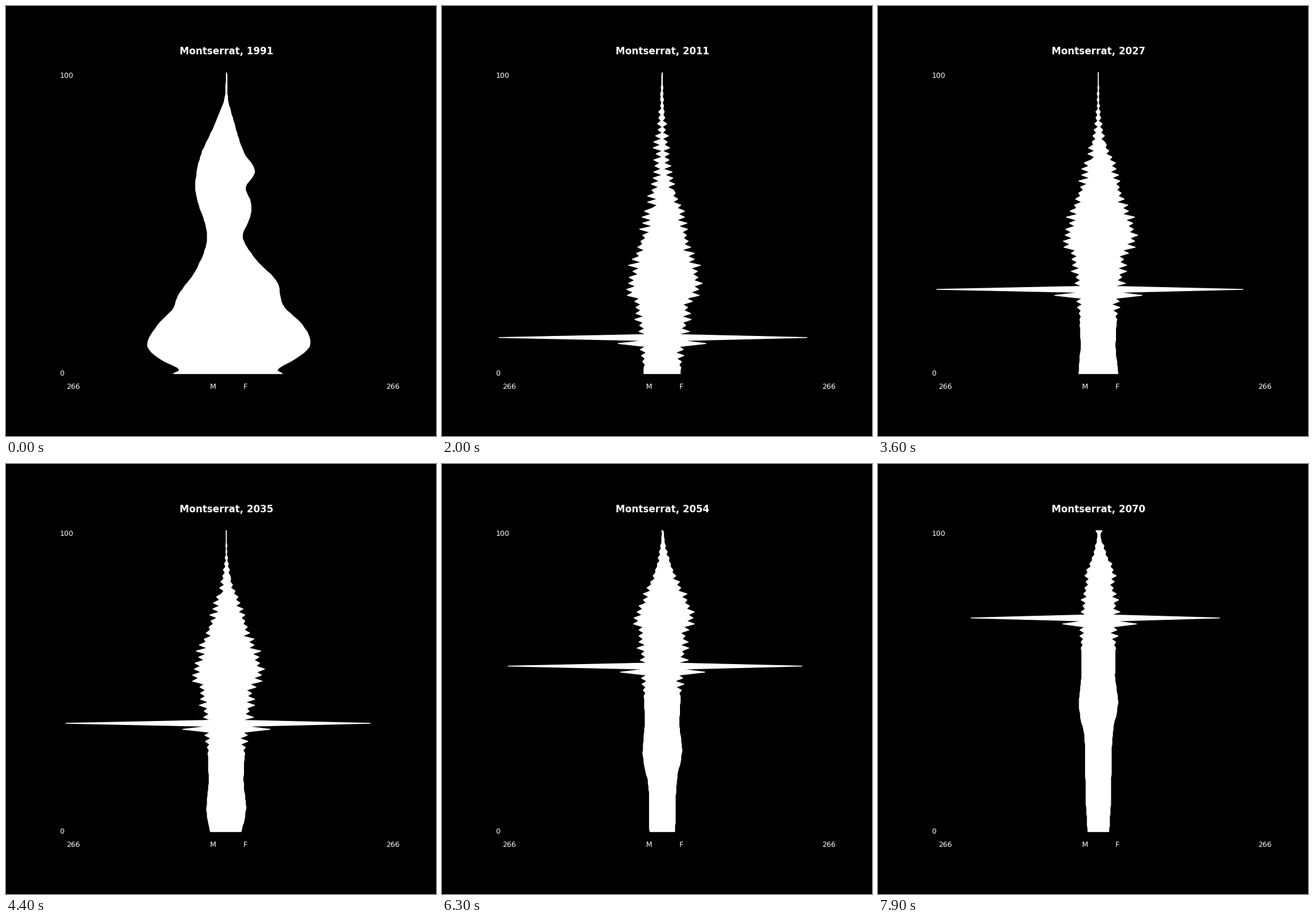
Write a matplotlib script that moves like this. It is 748 by 748 pixels and loops after 8000 ms.

```python
import numpy as np
import matplotlib.pyplot as plt
from matplotlib.animation import FuncAnimation

FIRST, YEARS = 1991, 80
AGES = np.arange(101)
BORN = np.arange(FIRST - 100, FIRST + YEARS)
HALF = 271  # half the axis width, in people

# Share of the 2000 head count still present in 2011, by birth year
KEPT = [(1911, .06), (1921, .2), (1926, .4), (1931, .63), (1936, .83), (1942, 1)]


def curve(x, points):
    return np.interp(x, *zip(*points))


def smooth(x, points):
    """Cubic Hermite curve through the points."""
    px, py = np.array(points, float).T
    slope = np.gradient(py, px)
    i = np.clip(np.searchsorted(px, x) - 1, 0, len(px) - 2)
    h = px[i + 1] - px[i]
    t = np.clip((x - px[i]) / h, 0, 1)
    s = 1 - t
    return (s * s * ((1 + 2 * t) * py[i] + t * h * slope[i])
            + t * t * ((3 - 2 * t) * py[i + 1] - s * h * slope[i + 1]))


def mix(a, b, t):
    return a + (b - a) * t


class Side:
    def __init__(self, seed, start, births, peaks, flip, alive, lag, oldest):
        self.start, self.alive = start, alive
        self.lag, self.oldest = lag, oldest

        # Cohorts alternate between large and small
        rng = np.random.default_rng(seed)
        sign = np.where((BORN % 2 == 1) == (BORN > flip), 1, -1)
        reach = np.interp(BORN, [1905, 1925, 2004, 2008, 2011], [0, 6, 6, 1, 0])
        zigzag = sign * reach * rng.uniform(.2, 1.8, len(BORN))
        self.size = np.maximum(curve(BORN, births) + zigzag, 0)
        for year, size in peaks:
            self.size[year - BORN[0]] = size

    def survival(self, born, since, year):
        share = curve(year - born, self.alive) / curve(since - born, self.alive)
        return share ** (1 + self.lag * np.clip((2054 - year) / 34, 0, 1))

    def at(self, year):
        born = year - AGES
        size = self.size[born - BORN[0]]
        size_2011 = size * curve(born, KEPT)
        size_2000 = size * np.interp(born, [1940, 1945, 2000, 2001], [1, .8, .8, 1])
        size_2000[born == 2000] = 0

        if year < 2000:
            t = np.clip((year - 1993) / 7, 0, 1)
            before = smooth(np.maximum(FIRST - born, 0), self.start)
            before = before * self.survival(born, FIRST, year)
            people = mix(before, size_2000, t * t * (3 - 2 * t))
        elif year < 2011:
            people = mix(size_2000, size_2011, 1 - (1 - (year - 2000) / 11) ** 3)
        else:
            people = size_2011 * self.survival(born, 2011, year)
            people[-1] += self.oldest * (max(year - 2050, 0) / 20) ** 2
        return np.round(np.maximum(people, 0))


men = Side(
    seed=3,
    start=[(0, 86), (1, 76), (2, 79), (4, 100), (8, 125), (16, 112), (22, 85),
           (25, 80), (34, 50), (43, 32), (63, 50), (72, 42), (84, 15.5),
           (91, 3), (100, 0)],
    births=[(1902, 0), (1912, 7.5), (1916, 12), (1925, 8.5), (1945, 10),
            (1957, 20), (1967, 33), (1973, 43), (1982, 48), (1984, 55),
            (1987, 38), (1997, 35), (2006, 29), (2010, 30), (2018, 28),
            (2022, 30), (2028, 32), (2033, 28.5), (2037, 23), (2041, 21.5),
            (2060, 20), (2070, 17)],
    peaks=[(1999, 266), (2001, 72)],
    flip=1955,
    alive=[(0, 1), (12, 1), (30, .99), (45, .976), (55, .942), (62, .9),
           (70, .8), (76, .66), (81, .5), (86, .35), (91, .18), (97, .045),
           (100, .015)],
    lag=.5, oldest=3.5)

women = Side(
    seed=8,
    start=[(0, 91), (1, 82), (2, 86), (4, 104), (8.5, 133), (16, 124),
           (22, 94), (31, 80), (38, 47), (46.5, 26.5), (50, 34.5), (54, 40),
           (57, 39), (62, 31), (67, 46), (73, 29), (82, 14), (91, 2.5),
           (100, .5)],
    births=[(1905, .5), (1912, 2), (1925, 6), (1934, 8), (1945, 8),
            (1953, 20), (1959, 32), (1968, 38), (1976, 53), (1980, 56),
            (1984, 53), (1989, 37), (1997, 36), (2006, 28), (2010, 29),
            (2018, 27), (2022, 29), (2027, 32), (2031, 29), (2035, 24),
            (2043, 21), (2060, 20), (2070, 17)],
    peaks=[(1999, 235), (2001, 71)],
    flip=1950,
    alive=[(0, 1), (30, 1), (45, .995), (55, .968), (62, .925), (70, .86),
           (76, .73), (81, .58), (86, .45), (91, .26), (97, .085), (100, .03)],
    lag=1.2, oldest=5)

plt.rcParams["font.family"] = "DejaVu Sans"
fig, ax = plt.subplots(figsize=(7.48, 7.48), dpi=100, facecolor="black")
ax.axis("off")
ax.set_xlim(-HALF, HALF)
ax.set_ylim(-5, 105)

shape, = ax.fill([0, 0, 0], [0, 1, 2], fc="white", ec="white", lw=1,
                 joinstyle="round")
title = ax.set_title("", color="white", fontsize=12, fontweight="bold",
                     y=1, pad=4)
for x, y, label in [(0, .939, "100"), (0, .04, "0"), (.02, 0, "266"),
                    (.45, 0, "M"), (.55, 0, "F"), (.98, 0, "266")]:
    ax.text(x, y, label, color="white", fontsize=9, transform=ax.transAxes)


def draw(i):
    year = FIRST + i
    xs = np.concatenate([-men.at(year), women.at(year)[::-1]])
    ys = np.concatenate([AGES, AGES[::-1]])
    shape.set_xy(np.column_stack([xs, ys]))
    title.set_text(f"Montserrat, {year}")
    return shape, title


anim = FuncAnimation(fig, draw, frames=YEARS, interval=100, repeat=True)
plt.show()
```
